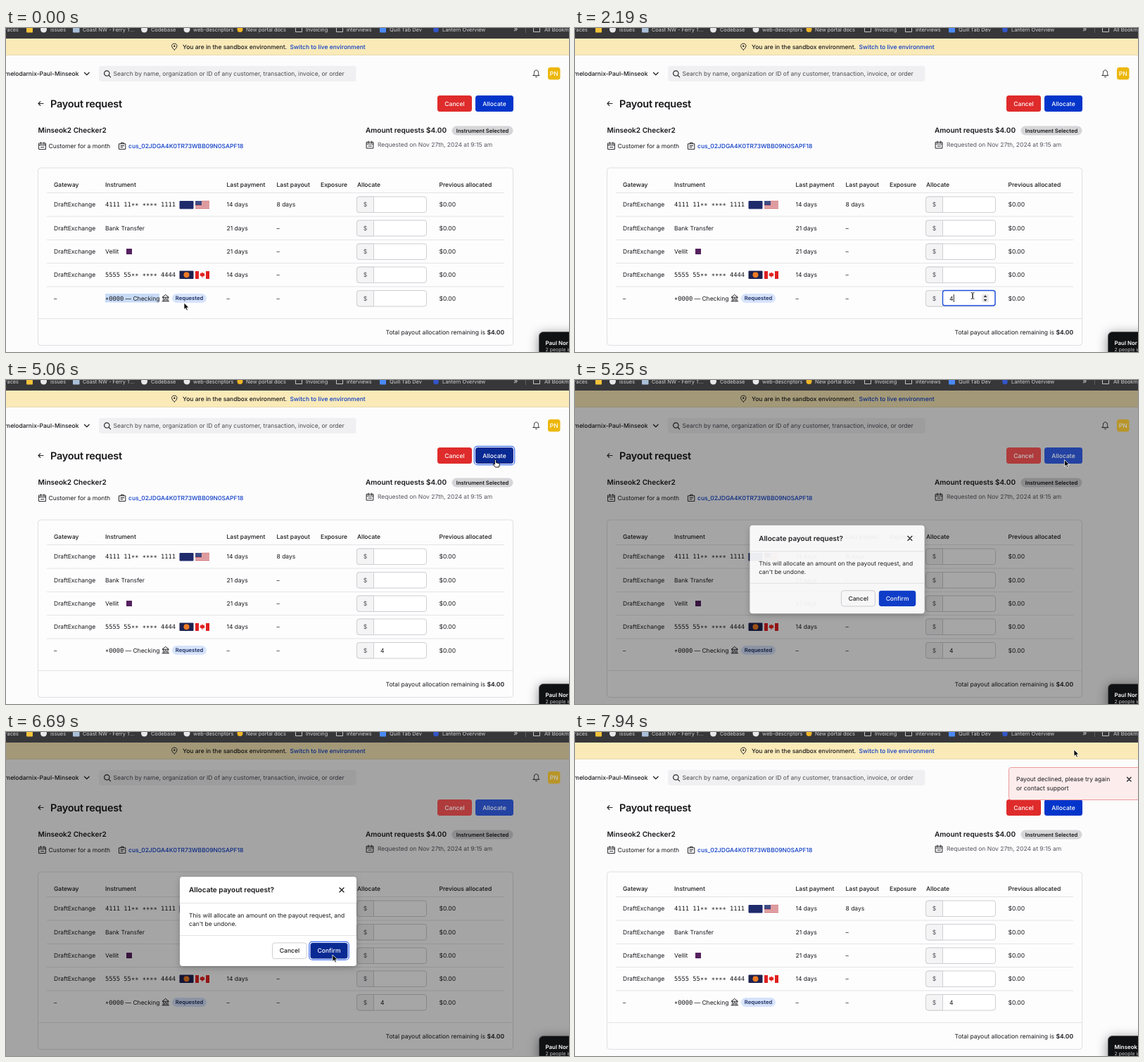
Animation of 800x461 px, one loop 8000 ms. Source, as an HTML page:

```html
<!DOCTYPE html>
<html lang="en">
<head>
<meta charset="utf-8">
<title>Payout request</title>
<style>
  html, body { margin: 0; width: 100%; height: 100%; overflow: hidden; background: #fcfcfd; }
  svg { display: block; width: 100vw; height: 100vh; }
  text { font: 400 8.5px Inter, sans-serif; fill: #18181b; white-space: pre; text-rendering: geometricPrecision; }
  .m { font-weight: 500; }
  .b { font-weight: 600; }
  .h { font-size: 10.05px; font-weight: 600; }
  .title { font-size: 14.5px; font-weight: 600; letter-spacing: -.28px; }
  .mono { font: 400 8.75px "DejaVu Sans Mono", monospace; }
  .pill { font-size: 7.65px; font-weight: 600; }
  .tab { font-size: 7.35px; fill: #d2d2d4; }
  .link { font-weight: 500; fill: #0b3bc4; }
  .grey { fill: #55565c; }
  .btn { font-size: 8.6px; font-weight: 500; text-anchor: middle; }
  .inv { fill: #fff; }
  .end { text-anchor: end; }
  .ico { fill: none; stroke: #27272a; stroke-linecap: round; stroke-linejoin: round; }
  .float { filter: drop-shadow(0 3px 5px rgba(0, 0, 0, .22)); }
  .panel { filter: drop-shadow(0 3px 8px rgba(0, 0, 0, .45)); }
</style>
</head>
<body>
<svg id="stage" viewBox="0 0 800 461" preserveAspectRatio="none"></svg>
<script>
const LOOP = 8000, BLUE = '#0435cb', DEEP = '#0a2a93';
const rows = [251, 284.5, 318, 351, 384.5];

const text = (x, y, s, cls = '', extra = '') => `<text x="${x}" y="${y}" class="${cls}" ${extra}>${s}</text>`;
const rect = (x, y, w, h, fill, r = 0, extra = '') =>
  `<rect x="${x}" y="${y}" width="${w}" height="${h}" rx="${r}" fill="${fill}" ${extra}/>`;
const dot = (x, y, r, fill) => `<circle cx="${x}" cy="${y}" r="${r}" fill="${fill}"/>`;
const icon = (d, extra = '') => `<path class="ico" d="${d}" ${extra}/>`;
const rule = (x, y, w, c = '#e4e4e7') => rect(x, y, w, 1, c);
const group = (id, body) => `<g id="${id}">${body}</g>`;
const cross = (x, y, r) => icon(`M${x - r} ${y - r}l${2 * r} ${2 * r}m0 ${-2 * r}l${-2 * r} ${2 * r}`, 'stroke-width="1.4"');
const ring = (id, x, y, w, h) => group(id,
  rect(x - 1.7, y - 1.7, w + 3.4, h + 3.4, '#fff', 4.5, 'stroke="#3b6cf0" stroke-width="1.2"'));

function browserBar() {
  const folder = x => icon(`M${x} -2v7.5h9v-6.5h-5`, 'style="stroke:#c4c4c6"');
  const labels = [[63, 'issues'], [109, 'Coast NW - Ferry T...'], [206, 'Codebase'], [266, 'web-descriptors'],
    [341, 'New portal docs'], [426, 'Invoicing'], [484, 'interviews'], [545, 'Quill Tab Dev'],
    [620, 'Lantern Overview'], [765, 'All Bookmarks']];
  return rect(0, 0, 800, 15, '#37373a') + text(18, 5, 'races', 'tab end') +
    rect(29, -2, 9, 8.5, '#f5c33b', 1) + dot(53.5, 2, 4.5, '#e8e8ea') + rect(95, -3, 9.5, 9.5, '#a9bfd8', 1) +
    dot(196.5, 2, 4.5, '#e8e8ea') + dot(257, 2, 4.5, '#e8e8ea') + dot(332.5, 2, 4, '#f0b429') +
    folder(411.5) + folder(469.5) + rect(531, -3, 9, 9.5, '#4a8af4', 1) + dot(611, 2.5, 3.8, '#3355c8') +
    folder(749.5) + text(721, 5, '»', 'tab', 'style="font-size:11px"') + rect(738, 0, 1, 7, '#5d5d60') +
    labels.map(([x, s]) => text(x, 5, s, 'tab')).join('');
}

function header() {
  return rect(0, 15, 800, 23, '#faeab8') + rule(0, 38, 800, '#e6d9b0') +
    icon('M239.3 31.2c-5.5-4.6-4.4-9 0-9s5.5 4.4 0 9z') + dot(239.3, 25.8, 1.2, '#27272a') +
    text(251, 30, 'You are in the sandbox environment.', 'm') + text(403.5, 30, 'Switch to live environment', 'link') +
    text(103.5, 68, 'melodarnix-Paul-Minseok', 'm end') + icon('M111.5 63.5l3.3 3.3l3.3-3.3', 'stroke-width="1.3"') +
    rect(132, 54, 365.5, 22, '#f0f0f2', 3.5) +
    icon('M147 64.5a3.7 3.7 0 1 0-7.4 0a3.7 3.7 0 1 0 7.4 0M146 67.3l2.6 2.6', 'stroke-width="1.2"') +
    text(152.5, 68, 'Search by name, organization or ID of any customer, transaction, invoice, or order', '', 'style="fill:#4a4a50"') +
    icon('M749.2 67.6h8.6c-1.3-1.2-1.3-2.6-1.3-4.2c0-4.6-6-4.6-6 0c0 1.6 0 3-1.3 4.2zM752.3 69.3c.5 1 1.9 1 2.4 0');
}

function summary() {
  const cal = (x, y) => icon(`M${x} ${y + 1.5}h9.4v8.6h-9.4zM${x} ${y + 4}h9.4M${x + 2.5} ${y}v2.5m4.4-2.5v2.5M${x + 2.5} ${y + 7}h4.4`);
  return icon('M53 107.5h-7m2.8-2.8l-2.8 2.8l2.8 2.8', 'stroke-width="1.2"') + text(63, 113, 'Payout request', 'title') +
    text(45.5, 149, 'Minseok2 Checker2', 'h') +
    cal(47, 162.5) + text(60.5, 171, 'Customer for a month') +
    icon('M160.8 164.8h9v7.6h-9zM163.5 164.8v-1.6h3.6v1.6M163 167.5h4.6m-4.6 2.2h3') +
    text(174, 171, 'cus_02JDGA4K0TR73WBB09N0SAPF18', 'link') +
    text(511, 149, 'Amount requests $4.00', 'h') +
    rect(633.5, 139.5, 87, 13, '#d6d6d9', 6.5) + text(677, 148.8, 'Instrument Selected', 'pill', 'text-anchor="middle"') +
    cal(512.5, 161) + text(528, 169.3, 'Requested on Nov 27th, 2024 at 9:15 am', 'grey');
}

function flags() {
  let us = rect(269, 246, 20, 11, '#f4eeee');
  for (let i = 0; i < 6; i++) us += rect(269, 246 + i * 2, 20, 1, '#c8494f');
  return us + rect(269, 246, 9, 6, '#3f4c86') +
    rect(269, 346, 20, 11, '#fff') + rect(269, 346, 5, 11, '#e0201f') + rect(284, 346, 5, 11, '#e0201f') +
    '<path d="M279 347l1 2l2.2-.4l-.5 2.2l1.3.8l-2.6 2h-1v1.8h-.8v-1.8h-1l-2.6-2l1.3-.8l-.5-2.2l2.2.4z" fill="#e0201f"/>';
}

function table() {
  const heads = [[68, 'Gateway'], [141, 'Instrument'], [313.5, 'Last payment'], [384.5, 'Last payout'],
    [447, 'Exposure'], [499, 'Allocate'], [615.5, 'Previous allocated']];
  const paid = ['14 days', '21 days', '21 days', '14 days', '–'];
  let s = rect(45.5, 199, 675, 252.5, '#fdfdfe', 4, 'stroke="#dfdfe3"') +
    heads.map(([x, h]) => text(x, 226, h, 'm')).join('');
  rows.forEach((y, i) => {
    const base = y + 3;
    s += rule(58, y - 17, 650) + text(68, base, i < 4 ? 'DraftExchange' : '–') +
      text(313.5, base, paid[i]) + text(384.5, base, i ? '–' : '8 days') + text(615.5, base, '$0.00') +
      rect(498.5, y - 11, 99, 22.5, '#fff', 3.5, 'stroke="#cfcfd4"') +
      `<path d="M522.5 ${y - 11}h-20.5q-3.5 0 -3.5 3.5v15.5q0 3.5 3.5 3.5h20.5z" fill="#f4f4f5" stroke="#cfcfd4"/>` +
      text(510.5, base, '$', 'grey', 'text-anchor="middle"');
  });
  return s + text(141, 254, '4111 11∗∗ ∗∗∗∗ 1111', 'mono') + rect(246.5, 246, 20, 11.5, '#1f2a6b', 1) +
    text(141, 287.5, 'Bank Transfer') + text(141, 321, 'Vellit') + rect(171, 314, 8, 8, '#56205f') +
    text(141, 354, '5555 55∗∗ ∗∗∗∗ 4444', 'mono') + rect(246.5, 345.5, 20, 11.5, '#1d2250', 1) + dot(256.5, 351.2, 4, '#ee7a23') +
    flags() + group('selection', rect(141, 378, 77, 12.5, '#c8dbf7')) +
    text(141, 387.5, '∗0000', 'mono') + text(169.5, 387.5, '— Checking') +
    icon('M222.3 383l4.4-3.6l4.4 3.6zM223.5 383v5.5m6.5-5.5v5.5M222 388.8h9.5M225.5 388v-3h2.5v3') +
    rect(236, 378, 49, 13, '#d6e3fb', 6.5) + text(260.5, 387.2, 'Requested', 'pill', 'text-anchor="middle" style="fill:#1c2c5e"') +
    group('focus', rect(522.5, 373.5, 74.5, 21.5, '#fff', 3, 'stroke="#1d4fdb" stroke-width="1.4"') +
      rect(578, 378.5, 10, 12, '#e9e9eb', 2) +
      '<path d="M580.6 383l2.4-3l2.4 3zM580.6 386l2.4 3l2.4-3z" fill="#333"/>') +
    group('value', text(532, 387.5, '4')) + rect(532.5, 379, .9, 11, '#111', 0, 'id="caret"') +
    rule(45.5, 413, 675) +
    text(708, 436, 'Total payout allocation remaining is <tspan class="b">$4.00</tspan>', 'end');
}

const actions = () => rect(613, 96, 49, 23, '#df2b2b', 3.5) + text(637.5, 110.6, 'Cancel', 'btn inv') +
  ring('allocRing', 667, 96, 54, 23) + rect(667, 96, 54, 23, BLUE, 3.5, 'id="alloc"') + text(694, 110.6, 'Allocate', 'btn inv') +
  rect(770, 56, 17.5, 17.5, '#ecb70c', 3.5) + text(778.8, 68, 'PN', 'btn inv');

const modal = () => rect(247, 206, 251, 127, '#fff', 4, 'class="float"') + text(260, 228.3, 'Allocate payout request?', 'h') +
  cross(477, 224.7, 3) + rule(247, 243, 251) +
  text(260, 263.5, 'This will allocate an amount on the payout request, and') + text(260, 276, "can't be undone.") +
  rule(247, 289, 251) + rect(378.5, 300, 48.5, 22.5, '#fff', 3.5, 'stroke="#cfcfd4"') + text(403, 314.3, 'Cancel', 'btn') +
  ring('confirmRing', 432.5, 300, 53, 22.5) + rect(432.5, 300, 53, 22.5, BLUE, 3.5, 'id="confirm"') + text(459, 314.3, 'Confirm', 'btn inv');

const toast = () => rect(616.5, 50.5, 200, 46, '#fdecec', 3, 'stroke="#ec9a9a"') +
  text(627, 70.3, 'Payout declined, please try again') + text(627, 82.8, 'or contact support') + cross(787.3, 67.2, 2.7);

const callPanel = () => rect(757.5, 432.5, 60, 40, '#101113', 6, 'stroke="#55565a" class="panel"') +
  text(766.5, 451, '', 'b inv', 'id="caller" style="font-size:7.9px"') +
  text(766.5, 459.5, '2 people in', '', 'style="font-size:7px;fill:#c9c9cc"');

const pointers = () =>
  group('arrow', '<path d="M0 0v9.5l2.2-2l1.5 3.5l1.7-.7l-1.5-3.4h3z" fill="#000" stroke="#fff" stroke-width=".8"/>') +
  group('beam', icon('M-2-4.5q2 0 2 1.2v6.6q0 1.2-2 1.2M2-4.5q-2 0-2 1.2v6.6q0 1.2 2 1.2')) +
  group('hand', '<path d="M-1 .8q1-1.6 2 0v3.4l4 .9q1 .4.8 1.6l-.8 3.8h-5.2l-3.3-4q.2-1.5 2.5.2z" fill="#fff" stroke="#000" stroke-width=".9"/>');

document.getElementById('stage').innerHTML = rect(0, 0, 800, 461, '#fcfcfd') + header() + summary() + table() +
  rect(0, 15, 800, 446, '#000', 0, 'id="shade"') + browserBar() + group('actions', actions()) +
  group('modal', modal()) + group('toast', toast()) + callPanel() + group('pointer', pointers());

const el = {};
document.querySelectorAll('#stage [id]').forEach(n => el[n.id] = n);

const clamp = v => Math.max(0, Math.min(1, v));
const span = (t, from, len) => clamp((t - from) / len);
const out = (p, n) => 1 - (1 - p) ** n;
const smooth = p => p * p * (3 - 2 * p);
const show = (node, on) => node.setAttribute('display', on ? 'inline' : 'none');
const within = ([x, y], l, t, r, b) => x >= l && x <= r && y >= t && y <= b;

// Pointer moves: start, end, target
const home = [253, 391];
const moves = [[150, 800, 565, 381], [2500, 3200, 649, 384], [3800, 4700, 695.5, 113.5],
  [5350, 6200, 464, 317], [6950, 7700, 709, 25]];
const FOCUS = 900, TYPE = 2000, CLICK = 4980, OPEN = 5125, CONFIRM = 6560, CLOSE = 6860, TOAST = 7150;

function pointerAt(t) {
  let [x, y] = home;
  for (const [from, to, tx, ty] of moves) {
    const p = smooth(span(t, from, to - from));
    x += (tx - x) * p;
    y += (ty - y) * p;
  }
  return [x, y];
}

function draw(t) {
  const pos = pointerAt(t), focused = t >= FOCUS && t < CLICK, typed = t >= TYPE;
  const overAlloc = t < OPEN && within(pos, 667, 96, 721, 119);
  const overConfirm = t > OPEN && t < CLOSE && within(pos, 432, 300, 486, 322);
  const hand = overAlloc || (overConfirm && t < CONFIRM), beam = within(pos, 523, 374, 597, 395);
  el.pointer.setAttribute('transform', `translate(${pos})`);
  show(el.hand, hand);
  show(el.beam, beam);
  show(el.arrow, !hand && !beam);

  show(el.selection, t < FOCUS);
  show(el.focus, focused);
  show(el.value, typed);
  show(el.caret, focused && (t - (typed ? TYPE : FOCUS)) % 1000 < 500);
  el.caret.setAttribute('x', typed ? 537.8 : 532.5);

  el.alloc.setAttribute('fill', overAlloc ? DEEP : BLUE);
  show(el.allocRing, t >= CLICK && t < OPEN);
  el.confirm.setAttribute('fill', overConfirm ? DEEP : BLUE);
  show(el.confirmRing, t >= CONFIRM);

  const leave = 1 - span(t, CLOSE, 150), enter = span(t, OPEN, 220);
  const dim = span(t, OPEN, 110) * leave;
  el.shade.setAttribute('opacity', .35 * dim);
  el.actions.style.opacity = 1 - .2 * dim;
  el.actions.style.filter = dim ? `brightness(${1 - .2 * dim})` : 'none';
  const scale = .94 + .06 * out(enter, 2) * leave;
  show(el.modal, enter * leave > 0);
  el.modal.setAttribute('opacity', out(enter, 3) * leave);
  el.modal.setAttribute('transform', `translate(372.5 269.5) scale(${scale}) translate(-372.5 -269.5)`);

  const slide = out(span(t, TOAST, 250), 3);
  show(el.toast, slide > 0);
  el.toast.setAttribute('opacity', slide);
  el.toast.setAttribute('transform', `translate(${60 * (1 - slide)} 0)`);
  el.caller.textContent = t < 7600 ? 'Paul Nor' : 'Minseok';
}

function tick() {
  draw(performance.now() % LOOP);
  requestAnimationFrame(tick);
}
tick();
</script>
</body>
</html>
```
